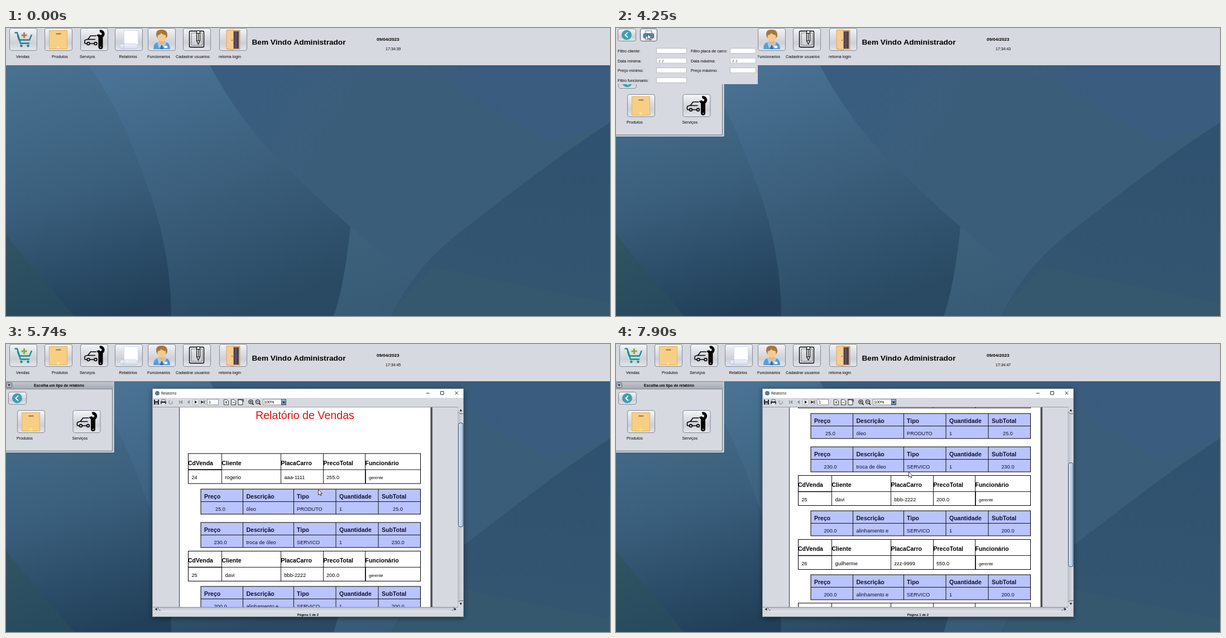
An HTML page with a canvas for the animation above (7990 ms loop, 1082x518 px).

```html
<!DOCTYPE html>
<html lang="pt">
<head>
<meta charset="utf-8">
<style>
html, body { margin: 0; width: 100%; height: 100%; overflow: hidden; background: #d6d9df; }
canvas { display: block; }
</style>
</head>
<body>
<canvas id="stage" width="1082" height="518"></canvas>
<script>
const c = document.getElementById('stage').getContext('2d');
const LOOP = 7990, PANEL = '#d6d9df';
let mouse = [0, 0];

// drawing helpers
const clamp = v => Math.max(0, Math.min(1, v));
const ramp = (t, from, to) => clamp((t - from) / (to - from));
function text(s, x, y, size, { bold, color = '#000', align = 'left', face = '"Liberation Sans", Arial, sans-serif' } = {}) {
  c.font = `${bold ? 'bold ' : ''}${size}px ${face}`;
  c.textAlign = align;
  c.fillStyle = color;
  c.fillText(s, x, y);
}
function rect(x, y, w, h, color) { c.fillStyle = color; c.fillRect(x, y, w, h); }
function frame(x, y, w, h, color = '#000', width = 1) {
  c.strokeStyle = color; c.lineWidth = width; c.strokeRect(x, y, w, h);
}
function round(x, y, w, h, r, fill, stroke, width = 1) {
  c.beginPath(); c.roundRect(x, y, w, h, r);
  if (fill) { c.fillStyle = fill; c.fill(); }
  if (stroke) { c.strokeStyle = stroke; c.lineWidth = width; c.stroke(); }
}
function shape(d, fill) { c.fillStyle = fill; c.fill(new Path2D(d)); }
function line(d, color, width = 1) { c.strokeStyle = color; c.lineWidth = width; c.stroke(new Path2D(d)); }
function disc(x, y, r, fill) { c.beginPath(); c.arc(x, y, r, 0, 7); c.fillStyle = fill; c.fill(); }
function gradient(x0, y0, x1, y1, ...colors) {
  const g = c.createLinearGradient(x0, y0, x1, y1);
  colors.forEach((color, i) => g.addColorStop(i / (colors.length - 1), color));
  return g;
}
function at(x, y, draw) { c.save(); c.translate(x, y); draw(); c.restore(); }
function popup(alpha, scale, cx, cy, draw) {
  c.save();
  c.globalAlpha = alpha;
  c.translate(cx, cy); c.scale(scale, scale); c.translate(-cx, -cy);
  draw();
  c.restore();
}

const icons = {
  cart(green) {
    const teal = green ? '#12938b' : '#1f7f90', plus = green ? '#7fae4a' : '#a67f52';
    line('M9.5 8.5H14L20 27.5H36M17 21.5H36L40 12', teal, 2.4);
    line('M15 13L18 22', teal, 3);
    disc(21.5, 32, 2.3, teal); disc(33.5, 32, 2.3, teal);
    line('M26.5 8V18M21.5 13H31.5', plus, 3);
  },
  box() {
    rect(8.5, 4.5, 32, 33, '#f6cf84');
    frame(8.5, 4.5, 32, 33, '#e3b158');
    rect(20.5, 9.5, 9, 2, '#94733f');
    rect(22, 33, 5, 4, '#fbe3a8');
  },
  service() {
    line('M12 28H9.5Q8 28 8 26V23.5Q8 21.5 11 21L14 20 18.5 14H29M17 28H25M14 20.5H27', '#000', 1.6);
    for (const x of [14.5, 27.5]) { c.beginPath(); c.arc(x, 28, 2.4, 0, 7); c.stroke(); }
    c.lineCap = 'round';
    line('M36.5 17V34', '#000', 8);
    c.lineCap = 'butt';
    c.beginPath(); c.arc(36.5, 10.5, 4.7, -1.9, 2.9); c.lineWidth = 5; c.stroke();
    disc(36.5, 34.5, 1.1, '#d6d9df');
  },
  report() {
    rect(16.5, 4.5, 25, 29, '#fff');
    frame(16.5, 4.5, 25, 29, '#cfd4e6', .8);
    round(9, 28.5, 32, 9, 4, gradient(0, 28, 0, 38, '#f4f5fb', '#d3d9ea'), '#b9c0d4', .8);
    line('M15 29Q19 33 14 37', '#b9c0d4');
  },
  person() {
    shape('M10 38Q10 26 20 25H30Q40 26 40 38Z', '#5d9dd3');
    shape('M20 22H30V26L25 32 20 26Z', '#eab67c');
    shape('M20 25L25 32 20 36 17 26ZM30 25L25 32 30 36 33 26Z', '#a9cdec');
    shape('M24 31H26L27.5 38H22.5Z', '#2f6ba4');
    shape('M15.5 15Q13 3 24 3Q36 2 35 15L32 19H18Z', '#a6783e');
    c.beginPath(); c.ellipse(25, 15.5, 7.5, 9, 0, 0, 7); c.fillStyle = '#f6c990'; c.fill();
    shape('M17 13Q18 6 25 6Q32 6 33 13Q26 12 24 9Q22 13 17 13Z', '#a6783e');
    rect(30, 32, 5, 4, '#fff');
  },
  register() {
    round(11.5, 5.5, 26, 29, 2, null, '#000', 1.3);
    c.setLineDash([1.5, 1]);
    frame(15, 9, 19.5, 22, '#333', .9);
    c.setLineDash([]);
    shape('M24.5 6Q27.5 3 30.5 6V23L27.5 29 24.5 23Z', '#eceef1');
    line('M24.5 6Q27.5 3 30.5 6V23L27.5 29 24.5 23ZM24.5 9.5H30.5M24.5 23H30.5M27.5 10V23', '#000', 1.1);
  },
  door() {
    rect(13.5, 3.5, 24, 35, '#d7a565');
    rect(25, 6, 10, 31, '#4e4150');
    rect(29, 6, 1.5, 31, '#75626c');
    shape('M13 4L25.5 3V40L13 37Z', '#f7cc91');
    line('M13 4L25.5 3V40L13 37Z', '#d39a5a', .8);
    disc(23, 22, 1, '#8a5a30');
  },
  back() {
    disc(16, 11.5, 9, '#3f9fb0');
    line('M18 7L13.5 11.5 18 16', '#fff', 1.8);
  },
  print() {
    rect(10, 4, 11, 6, '#fff'); frame(10, 4, 11, 6, '#456', .8);
    round(6.5, 9, 18, 8, 1.5, '#5b87a8', '#35566f');
    rect(10, 14, 11, 6, '#fff'); frame(10, 14, 11, 6, '#456', .8);
  }
};

function button(x, y, icon, { w = 50, h = 41, enabled = true, arg } = {}) {
  const hover = enabled && mouse[0] >= x && mouse[0] <= x + w && mouse[1] >= y && mouse[1] <= y + h;
  const fill = hover
    ? gradient(0, y, 0, y + h, '#fff', '#f4f5f7', '#e4e7ec', '#fbfbfd')
    : gradient(0, y, 0, y + h, '#f6f7f8', '#dfe1e6', '#cdd0d7', '#e6e8ec');
  round(x + .5, y + .5, w - 1, h - 1, 3.5, fill, hover ? '#4d5a70' : '#838993');
  at(x, y, () => icons[icon](arg));
}

function backdrop() {
  rect(0, 67, 1082, 451, gradient(420, 67, 640, 190, '#395d7f', '#3a5e79'));
  shape('M715 67H1082V170L975 205Z', gradient(760, 140, 860, 80, '#3a5e7a', '#395c7f'));
  shape('M617 357L716 443 810 518H587Q610 430 617 357Z', gradient(617, 357, 660, 518, '#3e627c', '#375b75'));
  shape('M1082 170C1000 222 900 300 820 362S715 470 690 518H1082Z', gradient(900, 200, 860, 518, '#2f5270', '#345670'));
  shape('M765 430L1082 495V518H690Q720 470 765 430Z', '#35586f');
  shape('M140 67H365C415 160 470 220 490 238C540 288 580 326 617 357Q606 465 587 518H140Z',
    gradient(250, 67, 420, 518, '#497294', '#3b5f7c', '#2a4a63'));
  shape('M0 67H148C205 148 232 225 262 308Q296 415 296 518H0Z',
    gradient(60, 67, 190, 518, '#48718f', '#3a5f7d', '#213f58'));
  shape('M0 372L122 518H0Z', gradient(0, 372, 40, 518, '#315565', '#284a5d'));
}

const toolbar = [
  [6, 'cart', 'Vendas', 18], [69, 'box', 'Produtos', 82], [133, 'service', 'Serviços', 132],
  [195, 'report', 'Relatórios', 202.5], [254, 'person', 'Funcionarios', 253],
  [317, 'register', 'Cadastrar usuarios', 304], [382, 'door', 'retorna login', 381]
];
function header(t, enabled) {
  rect(0, 0, 1082, 67, PANEL);
  for (const [x, icon, label, labelX] of toolbar) {
    button(x, 0, icon, { enabled, arg: t > 3300 });
    text(label, labelX, 53.5, 7.2);
  }
  text('Bem Vindo Administrador', 440.5, 29.5, 13.65, { bold: true });
  text('09/04/2023', 664, 23.3, 8.1, { bold: true });
  text('17:34:' + (39 + Math.floor((t + 307) / 1007)), 680, 40, 7);
}

function chooser(enabled) {
  rect(0, 67, 193, 128, '#c9cdd4');
  rect(0, 68, 193, 13, gradient(0, 68, 0, 81, '#c3c7ce', '#a4a9b2'));
  rect(0, 81, 190, 111, PANEL);
  line('M0 67.5H193M0 81H191', '#7c828c');
  line('M190.5 81V192.5H0', '#6b727d');
  line('M193 67V194.5H0', '#eceef1');
  round(.5, 69.5, 10, 9, 2, '#b4b9c2', '#555c66');
  shape('M3 72.5H8L5.5 76Z', '#222');
  text('Escolha um tipo de relatório', 95, 77, 6.7, { bold: true, align: 'center' });
  button(4, 86, 'back', { w: 33, h: 23, enabled });
  button(20, 119, 'box', { enabled });
  button(119.5, 119, 'service', { enabled });
  text('Produtos', 19, 172, 7.2);
  text('Serviços', 118.5, 172, 7.2);
}

function filters() {
  rect(0, 0, 254, 101, PANEL);
  button(3, 1, 'back', { w: 33, h: 23 });
  button(43, 1, 'print', { w: 31, h: 23 });
  [['Filtro cliente:', 'Filtro placa de carro:'], ['Data mínima:', 'Data máxima:'],
   ['Preço mínimo:', 'Preço máximo:'], ['Filtro funcionario:']].forEach((row, i) => row.forEach((label, j) => {
    const x = j ? 134 : 3, y = 44 + i * 17.6, fieldX = j ? 204 : 72;
    text(label, x, y, 7.2);
    rect(fieldX, y - 8, j ? 47 : 55, 10, '#fff');
    frame(fieldX + .5, y - 7.5, j ? 46 : 54, 9, '#a5abb5', .8);
    if (i == 1) text('/  /', fieldX + 5, y, 7.2);
  }));
}

// report page
function grid(x, y, h, split, columns, fill) {
  if (fill) rect(x, y, 742.5 - x, h, fill);
  frame(x, y, 742.5 - x, h);
  line(`M${x} ${y + split}H742.5` + columns.map(v => `M${v} ${y}V${y + h}`).join(''), '#000', .9);
}
function sale(y, id, client, plate, total) {
  const columns = [386.5, 492.5, 568.5, 643.5];
  grid(326.5, y, 54, 29, columns);
  line(`M326 ${y + 29}H386.5M644 ${y + 29}V${y + 54}`, '#000', 1.5);
  ['CdVenda', 'Cliente', 'PlacaCarro', 'PrecoTotal', 'Funcionário'].forEach((s, i) =>
    text(s, i ? columns[i - 1] : 326, y + 20.8, 10.5, { bold: true }));
  [id, client, plate, total].forEach((s, i) => text(s, [332.5, 392.5, 498.5, 574][i], y + 46, 9.2));
  text('gerente', 650, y + 46, 7.5);
}
function item(y, price, description, kind) {
  const ink = '#10122e';
  grid(349, y, 45, 22.5, [424.5, 515.5, 591, 667], '#b9c3fd');
  ['Preço', 'Descrição', 'Tipo', 'Quantidade', 'SubTotal'].forEach((s, i) =>
    text(s, 355 + [0, 75.5, 166, 242, 318][i], y + 16.5, 10.5, { bold: true, color: ink }));
  for (const x of [384, 702]) text(price, x, y + 39.3, 9.2, { align: 'center', color: ink });
  [description, kind, '1'].forEach((s, i) => text(s, [430.5, 521, 597][i], y + 39.3, 9.2, { color: ink }));
}
function page(scroll) {
  const top = 123 - scroll, y = 231 - scroll;
  rect(313, top + 3, 451, 637, '#55585f');
  rect(310, top, 451, 637, '#fff');
  frame(310.5, top, 450.5, 637, '#333');
  text('Relatório de Vendas', 447, y - 61.7, 19.65, { color: '#e8100c' });
  sale(y, '24', 'rogerio', 'aaa-1111', '255.0');
  item(y + 64, '25.0', 'óleo', 'PRODUTO');
  item(y + 124, '230.0', 'troca de óleo', 'SERVICO');
  sale(y + 175.5, '25', 'davi', 'bbb-2222', '200.0');
  item(y + 239, '200.0', 'alinhamento e', 'SERVICO');
  sale(y + 290.5, '26', 'guilherme', 'zzz-9999', '550.0');
  item(y + 354, '200.0', 'alinhamento e', 'SERVICO');
  sale(y + 405, '27', 'davi', 'bbb-2222', '200.0');
}

function reportToolbar() {
  rect(265, 100, 9, 9, '#23262b'); rect(267, 100, 5, 3, '#d8dade'); rect(267, 105, 5, 4, '#8d98a8');
  rect(279, 100, 6, 4, '#fff'); frame(279, 100, 6, 4, '#333', .8);
  round(277, 103, 10, 5, 1, '#3a3d42'); rect(279, 106, 6, 3, '#eee');
  c.beginPath(); c.arc(295, 104.5, 3.2, -.6, 4.3); c.strokeStyle = '#8d9299'; c.lineWidth = 1.2; c.stroke();
  shape('M316 101V108L311.5 104.5ZM310 101H311.2V108H310ZM329 101V108L324.5 104.5Z', '#8d9299');
  round(334.5, 99.5, 10, 10, 2, '#eceef1', '#9aa0aa', .8);
  round(347.5, 99.5, 10, 10, 2, '#eceef1', '#9aa0aa', .8);
  shape('M338 101.5V107.5L342 104.5ZM349.5 101.5V107.5L353.5 104.5ZM354.2 101.5H355.5V107.5H354.2Z', '#111');
  rect(360.5, 99.5, 20, 10, '#fff'); frame(360.5, 99.5, 20, 10, '#8b919c');
  text('1', 363, 107.3, 7.2);
  for (const x of [390.5, 403.5, 416]) {
    shape(`M${x} 100H${x + 5}L${x + 8} 103V109.500H${x}Z`, '#fff');
    line(`M${x} 100H${x + 5}L${x + 8} 103V109.500H${x}Z`, '#333');
  }
  rect(393, 103, 3, 4, '#777'); line('M405.500 105H409.500', '#333'); line('M415 100H425V104', '#333', 1.4);
  for (const [x, sign] of [[438.5, 'M436.5 104H440.5M438.5 102V106'], [451, 'M449 104H453']]) {
    c.beginPath(); c.arc(x, 104, 3.5, 0, 7); c.strokeStyle = '#222'; c.lineWidth = 1.2; c.stroke();
    line(sign, '#222'); line(`M${x + 2.5} 106.500L${x + 5} 109.500`, '#222', 1.8);
  }
  rect(460.5, 99.5, 33, 10, '#fff'); frame(460.5, 99.5, 33, 10, '#8b919c');
  text('100%', 462, 107.3, 7.2);
  rect(493.5, 99.5, 8, 10, gradient(0, 99, 0, 110, '#a9c0d8', '#5c7fa5')); frame(493.5, 99.5, 8, 10, '#3c5473');
  shape('M495 103.500H500L497.500 106.500Z', '#111');
}

function scrollbars(scroll) {
  rect(809, 113, 11, 360, gradient(809, 0, 820, 0, '#b9bec6', '#dfe2e7'));
  rect(810, 114, 10, 11, PANEL); rect(810, 462, 10, 11, PANEL);
  shape('M812.500 121H817L814.750 117ZM812.500 465.500H817L814.750 469.500Z', '#222');
  line('M810 122Q811 125.500 819 125.500M810 464Q811 461.500 819 461.500', '#555c66');
  round(810.5, 124 + scroll * .527, 8.5, 187, 3.5, gradient(810, 0, 819, 0, '#e3eaf3', '#c2d2e4', '#a9c0da'), '#3c557a');
  rect(263, 473, 557, 9, gradient(0, 473, 0, 482, '#b9bec6', '#e4e6ea'));
  rect(263, 473, 12, 9, PANEL); rect(800, 473, 20, 9, PANEL);
  shape('M270.500 474.500V479.500L266.500 477ZM803 474.500V479.500L807 477Z', '#222');
  line('M272 473Q273 479 277 479.500M803 473Q802 479 798 479.500', '#555c66');
  line('M263 473.500H810', '#8b919c');
}

function report(t, scroll) {
  c.shadowColor = 'rgba(0,0,0,.45)'; c.shadowBlur = 9; c.shadowOffsetY = 2;
  rect(262, 80, 558, 411, '#fff');
  c.shadowColor = 'transparent';
  disc(271, 88.5, 4, '#5c7d99');
  text('Relatório', 278, 91, 6.5, { face: '"Open Sans", sans-serif' });
  line('M753 88.500H758.500M778.500 85.500H784V91H778.500ZM804.500 85.500L810 91M810 85.500L804.500 91', '#111', .9);
  if (t < 4930) return;
  rect(263, 97, 557, 394, PANEL);
  reportToolbar();
  line('M263 113.500H809', '#9499a2');
  if (t > 5040) {
    c.save();
    c.beginPath(); c.rect(263, 114, 546, 359); c.clip();
    page(scroll);
    c.restore();
    text('Página 1 de 2', 541, 489.3, 6, { bold: true, align: 'center' });
  }
  scrollbars(scroll);
  frame(262.5, 80.5, 557, 410, '#6f7a86', .7);
}

// pointer keyframes: time, x, y
const path = [
  [120, 957, 492], [500, 690, 390], [880, 332, 218], [950, 329, 214], [1500, 212.5, 43], [1590, 212.5, 43],
  [1700, 213, 29], [2190, 213, 29], [2700, 159, 135], [3500, 159, 135], [3900, 77, 25], [3970, 77, 25],
  [4310, 55, 9.5], [4780, 55, 9.5], [5270, 559.5, 262], [7740, 559.5, 262], [7890, 524.5, 230], [LOOP, 524.5, 230]
];
function pointerAt(t) {
  const i = Math.max(1, path.findIndex(p => p[0] > t)), [a, b] = [path[i - 1], path[i]];
  const k = ramp(t, a[0], b[0]), e = k * k * (3 - 2 * k);
  return [a[1] + (b[1] - a[1]) * e, a[2] + (b[2] - a[2]) * e];
}
function pointer() {
  at(...mouse, () => {
    const arrow = 'M0 0V9.500L2.300 7.500 3.900 11 5.400 10.300 3.900 7H7Z';
    shape(arrow, '#fff');
    line(arrow, '#111', .8);
  });
}

const wheel = [5340, 5480, 6410, 6540, 6670, 7090, 7170, 7420, 7465, 7510];

function render(now) {
  const t = now % LOOP;
  mouse = t < 120 ? [-50, -50] : pointerAt(t);
  const scroll = 17 * wheel.filter(w => t >= w).length;
  const filterAlpha = t < 4510 ? ramp(t, 3280, 3490) : 1 - ramp(t, 4510, 4630);
  const free = filterAlpha < .6;
  backdrop();
  header(t, free);
  if (t >= 1780) chooser(free);
  if (filterAlpha > 0) popup(filterAlpha, .94 + .06 * filterAlpha, 127, 50, filters);
  if (t > 4680) {
    const k = ramp(t, 4680, 4900);
    popup(k, .947 + .053 * k, 541, 285.5, () => report(t, scroll));
  }
  if (t >= 120) pointer();
  requestAnimationFrame(() => render(performance.now()));
}
render(performance.now());
</script>
</body>
</html>
```
